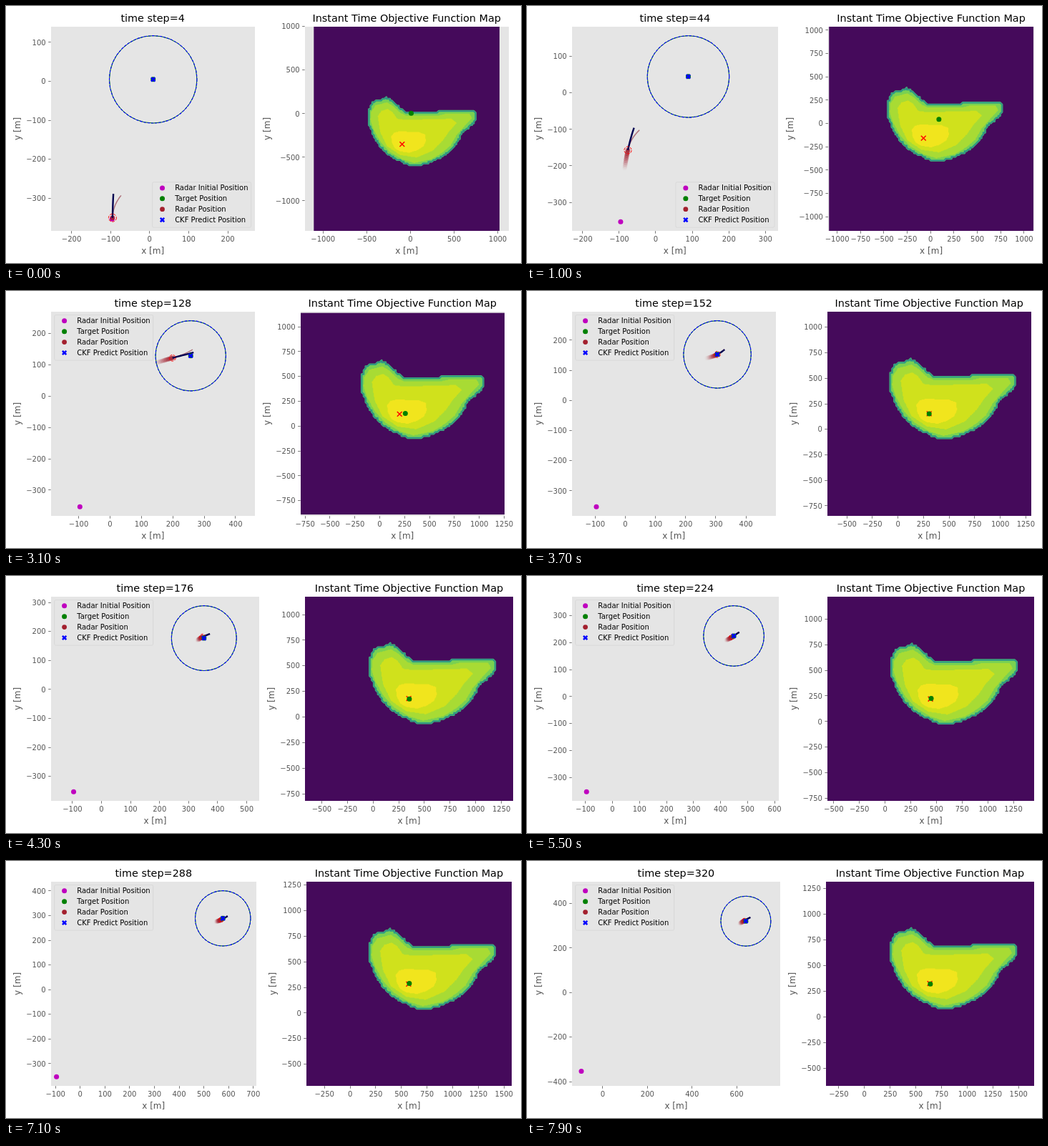
Animation, 720 px wide and 360 px high, one loop 8 s. Source, as an HTML page with a canvas:

```html
<!DOCTYPE html>
<html lang="en">
<head>
<meta charset="utf-8">
<title>Radar tracking</title>
<style>
html, body { margin: 0; width: 720px; height: 360px; overflow: hidden; background: #fff; }
canvas { display: block; }
</style>
</head>
<body>
<canvas id="stage" width="720" height="360"></canvas>
<script>
const ctx = document.getElementById('stage').getContext('2d');
const TOP = 28.6, BOTTOM = 315.2, H = BOTTOM - TOP, LEFT = 62.7, RIGHT = 709.2;
const MID = (TOP + BOTTOM) / 2;
const FRAMES = 80, FRAME_MS = 100;
const START = [-96, -353], RANGE = 112;
const GREY = '#555555', FACE = '#e5e5e5', BROWN = '#a3202e', GREEN = '#008000';
const font = px => px + 'px "DejaVu Sans", sans-serif';

// ---- motion ----
const target = s => [2 * s + 1, s + 0.8];

// step, x, y, vx, vy
const KEYS = [
  [4, -95, -350, 0.1, 4.6],
  [88, 16, 32, 3.4, 3.5],
  [128, 199, 122, 5, 1.4],
  [148, 294, 148, 3, 1.2],
  [176, 348, 181, 2, 1]
];

function radar(s) {
  if (s <= 4) return [-95, -350];
  if (s >= 176) {
    const a = (s - 176) / 76 * 2 * Math.PI;
    return [2 * s - 4 - 2 * Math.sin(a / 2) ** 2, s + 5 * Math.cos(a)];
  }
  let i = 0;
  while (s >= KEYS[i + 1][0]) i++;
  const a = KEYS[i], b = KEYS[i + 1], d = b[0] - a[0], u = (s - a[0]) / d;
  const h = n => {
    const u2 = u * u, u3 = u2 * u;
    return (2 * u3 - 3 * u2 + 1) * a[n] + (u3 - 2 * u2 + u) * d * a[n + 2]
         + (3 * u2 - 2 * u3) * b[n] + (u3 - u2) * d * b[n + 2];
  };
  return [h(1), h(2)];
}

// ---- axes ----
// Equal scale on both axes: margins may shrink to 5% before the other axis grows.
function view(xr, yr, margin, w) {
  const rx = xr[1] - xr[0], ry = yr[1] - yr[0];
  const kx = w / (rx * margin), ky = H / (ry * margin), big = Math.max(kx, ky);
  const fits = w / big >= 1.05 * rx && H / big >= 1.05 * ry;
  const k = fits ? big : Math.min(kx, ky);
  return { k, w, cx: (xr[0] + xr[1]) / 2, cy: (yr[0] + yr[1]) / 2 };
}

function sceneView(s, w) {
  const [tx, ty] = target(s), [rx, ry] = radar(s);
  return view([Math.min(START[0], rx - 10, tx - RANGE), tx + RANGE],
              [Math.min(START[1], ry - 10), ty + RANGE], 1.1, w);
}

function mapSpan(s, pad) {
  const t = target(s), r = radar(s);
  return [0, 1].map(n => [Math.min(t[n], r[n]) - pad, Math.max(t[n], r[n]) + pad]);
}
const mapView = (s, w) => view(...mapSpan(s, 996), 1, w);

function ticks(c, half) {
  const raw = 2 * half / 9, p = 10 ** Math.floor(Math.log10(raw));
  const step = [1, 2, 2.5, 5, 10].find(m => m * p >= raw) * p;
  const out = [];
  for (let v = Math.ceil((c - half) / step) * step; v <= c + half; v += step) out.push(v);
  return out;
}
const xTicks = v => ticks(v.cx, v.w / 2 / v.k);
const yTicks = v => ticks(v.cy, H / 2 / v.k);
const label = v => (v < 0 ? '\u2212' : '') + Math.abs(v);

function labelWidth(v) {
  ctx.font = font(10);
  return ctx.measureText(label(v)).width;
}
const widest = list => Math.max(...list.map(labelWidth));

function overhang(v) {
  const last = xTicks(v).pop();
  return Math.max(0, labelWidth(last) / 2 - (v.w / 2 - (last - v.cx) * v.k));
}

// Each layout is packed using the width of the one before it.
function layouts() {
  const list = [];
  let w = 267;
  for (let i = 0; i < FRAMES; i++) {
    const s = 4 + 4 * i, m = mapView(s, w);
    const gap = 36.2 + widest(yTicks(m)) + overhang(sceneView(s, w));
    const end = RIGHT - overhang(m);
    w = (end - LEFT - gap) / 2;
    list.push({ s, w, mapX: end - w });
  }
  return list;
}

function place(v, x0) {
  v.x0 = x0;
  v.at = ([x, y]) => [x0 + v.w / 2 + (x - v.cx) * v.k, MID - (y - v.cy) * v.k];
  return v;
}

function text(str, x, y, px, color, align) {
  ctx.font = font(px);
  ctx.fillStyle = color;
  ctx.textAlign = align;
  ctx.fillText(str, x, y);
}

function clipAxes(v) {
  const x = Math.round(v.x0), y = Math.round(TOP);
  ctx.beginPath();
  ctx.rect(x, y, Math.round(v.x0 + v.w) - x, Math.round(BOTTOM) - y);
  ctx.fillStyle = FACE;
  ctx.fill();
  ctx.clip();
}

function drawAxes(v, title) {
  const mid = v.x0 + v.w / 2, snap = n => Math.floor(n) + 0.5;
  ctx.strokeStyle = GREY;
  ctx.lineWidth = 0.8;
  ctx.beginPath();
  for (const n of xTicks(v)) {
    const x = v.at([n, 0])[0];
    ctx.moveTo(snap(x), BOTTOM);
    ctx.lineTo(snap(x), BOTTOM + 3.5);
    text(label(n), x, 329.8, 10, GREY, 'center');
  }
  for (const n of yTicks(v)) {
    const y = v.at([0, n])[1];
    ctx.moveTo(v.x0 - 3.5, snap(y));
    ctx.lineTo(v.x0, snap(y));
    text(label(n), v.x0 - 7, y + 3.7, 10, GREY, 'right');
  }
  ctx.stroke();
  text(title, mid, 22.3, 14.4, '#000', 'center');
  text('x [m]', mid, 346.6, 12, GREY, 'center');
  ctx.save();
  ctx.translate(v.x0 - 15 - widest(yTicks(v)), MID);
  ctx.rotate(-Math.PI / 2);
  text('y [m]', 0, 0, 12, GREY, 'center');
  ctx.restore();
}

// ---- marks ----
function dot([x, y], r, color) {
  ctx.fillStyle = color;
  ctx.beginPath();
  ctx.arc(x, y, r, 0, 7);
  ctx.fill();
}

function ring([x, y], r, color, width, dash = []) {
  ctx.strokeStyle = color;
  ctx.lineWidth = width;
  ctx.setLineDash(dash);
  ctx.beginPath();
  ctx.arc(x, y, r, 0, 2 * Math.PI);
  ctx.stroke();
  ctx.setLineDash([]);
}

function fatCross([x, y]) {
  const u = 1.8;
  ctx.fillStyle = '#0000ff';
  ctx.beginPath();
  for (let q = 0; q < 4; q++) {
    const c = Math.cos(q * Math.PI / 2) * u, s = Math.sin(q * Math.PI / 2) * u;
    for (const [a, b] of [[1, 0], [2, 1], [1, 2]]) ctx.lineTo(x + a * c - b * s, y + a * s + b * c);
  }
  ctx.fill();
}

function thinCross([x, y]) {
  ctx.strokeStyle = '#ff0000';
  ctx.lineWidth = 1.5;
  ctx.beginPath();
  for (const d of [-3.4, 3.4]) {
    ctx.moveTo(x - 3.4, y - d);
    ctx.lineTo(x + 3.4, y + d);
  }
  ctx.stroke();
}

function line(points, color, width) {
  ctx.strokeStyle = color;
  ctx.lineWidth = width;
  ctx.lineJoin = 'round';
  ctx.beginPath();
  points.forEach(p => ctx.lineTo(...p));
  ctx.stroke();
}

function legend(v, s) {
  const w = 138, h = 63.5, low = s < 124;
  const x = low ? v.x0 + v.w - 5 - w : v.x0 + 5;
  const y = low ? BOTTOM - 5 - h : TOP + 5;
  ctx.beginPath();
  ctx.roundRect(x, y, w, h, 2);
  ctx.fillStyle = 'rgba(229,229,229,0.8)';
  ctx.fill();
  ctx.strokeStyle = 'rgba(204,204,204,0.8)';
  ctx.lineWidth = 0.6;
  ctx.stroke();
  const rows = [
    ['Radar Initial Position', p => dot(p, 3.5, '#bf00bf')],
    ['Target Position', p => dot(p, 3.5, GREEN)],
    ['Radar Position', p => dot(p, 3.4, BROWN)],
    ['CKF Predict Position', fatCross]
  ];
  rows.forEach(([name, mark], i) => {
    const cy = y + 8.2 + 14.9 * i;
    mark([x + 13.9, cy]);
    text(name, x + 31.5, cy + 3.4, 10, '#000', 'left');
  });
}

// ---- left: tracking scene ----
function altTurn(s) {
  if (s < 88) return -0.33 + 0.0019 * (s - 4);
  return s < 150 ? Math.min(0.15, -0.17 + 0.0078 * (s - 88)) : 0.05;
}

function drawScene(v, s) {
  const r = radar(s), at = v.at, tp = at(target(s)), rp = at(r);
  ctx.save();
  clipAxes(v);
  const plan = [], alt = [], turn = altTurn(s), ahead = 13;
  for (let i = 0; i <= ahead; i++) {
    const p = radar(s + i), a = turn * i / ahead;
    const dx = p[0] - r[0], dy = p[1] - r[1];
    plan.push(at(p));
    alt.push(at([r[0] + dx * Math.cos(a) - dy * Math.sin(a),
                 r[1] + dx * Math.sin(a) + dy * Math.cos(a)]));
  }
  dot(at(START), 3.5, '#bf00bf');
  for (let i = 10; i >= 0; i--) {
    if (s - i < 3) continue;
    ctx.globalAlpha = 0.7 * (1 - i / 11) ** 1.3;
    dot(at(radar(s - i)), 3.2, BROWN);
  }
  ctx.globalAlpha = 0.6;
  line(alt, '#8c2a38', 1.5);
  ctx.globalAlpha = 1;
  line(plan, '#000050', 2.4);
  ring(rp, 10 * v.k, '#ff0000', 1, [3.7, 1.6]);
  ring(tp, RANGE * v.k, GREEN, 1);
  ring(tp, RANGE * v.k, '#0000ff', 1.1, [3.7, 1.6]);
  dot(tp, 3.5, GREEN);
  fatCross(tp);
  legend(v, s);
  ctx.restore();
}

// ---- right: objective map, outlines around the radar ----
const UNIT = 1 / 0.1437;
const OUTER = [-56,-38, -55,-54, -50,-66, -42,-73, -35,-73, -27,-77, -19,-73, -9,-64, 6,-52,
  55,-52, 64,-55, 118,-55, 122,-51, 122,-41, 114,-32, 100,-21, 91,-5, 83,7, 69,18, 50,28,
  28,34, 12,34, -6,26, -25,15, -40,-2, -50,-22];
const MIDDLE = [-52,-40, -51,-53, -44,-64, -25,-69, -15,-63, -2,-51, 8,-47, 60,-47, 70,-50,
  111,-50, 115,-43, 103,-30, 89,-14, 80,2, 66,14, 48,25, 20,31, 0,25, -20,13, -35,-3, -47,-24];
const INNER = [-40,-46, -34,-55, -24,-58, -16,-53, -8,-42, 6,-40, 81,-42, 90,-35, 78,-22,
  67,-6, 50,11, 24,22, -3,18, -25,3, -36,-20];
const CORE = [-18,-13, -13,-19, -5,-21, 27,-20, 38,-16, 39,-5, 35,4, 25,10, 12,14, -3,12,
  -12,7, -17,-3];

function outline(flat, cell) {
  const out = [], n = flat.length;
  const snap = q => Math.round(q * UNIT / cell) * cell;
  for (let i = 0; i < n; i += 2) {
    const x = flat[i], y = flat[i + 1], dx = flat[(i + 2) % n] - x, dy = flat[(i + 3) % n] - y;
    const parts = Math.ceil(Math.hypot(dx, dy) * UNIT / cell);
    for (let j = 0; j < parts; j++) out.push([snap(x + dx * j / parts), -snap(y + dy * j / parts)]);
  }
  return out;
}
const EDGE = outline(OUTER, 20);
const BANDS = [
  [outline(MIDDLE, 7), '#a8db34'],
  [outline(INNER, 7), '#d0e11c'],
  [outline(CORE, 7), '#f1e51d']
];

function trace(points, at, [ox, oy]) {
  ctx.beginPath();
  points.forEach(([x, y]) => ctx.lineTo(...at([x + ox, y + oy])));
  ctx.closePath();
}

function drawMap(v, s) {
  const r = radar(s), at = v.at;
  ctx.save();
  clipAxes(v);
  const [xs, ys] = mapSpan(s, 1011);
  const [x1, y1] = at([xs[0], ys[1]]), [x2, y2] = at([xs[1], ys[0]]);
  ctx.fillStyle = '#450a5b';
  ctx.fillRect(x1, y1, x2 - x1, y2 - y1);
  trace(EDGE, at, r);
  ctx.lineJoin = 'round';
  ctx.fillStyle = '#7ad151';
  ctx.fill();
  for (const [color, width] of [['#4ac16d', 2.8], ['#2c8f8a', 1.5]]) {
    ctx.strokeStyle = color;
    ctx.lineWidth = width;
    ctx.stroke();
  }
  for (const [points, color] of BANDS) {
    trace(points, at, r);
    ctx.fillStyle = color;
    ctx.fill();
  }
  thinCross(at(r));
  dot(at(target(s)), 3.5, GREEN);
  ctx.restore();
}

// ---- playback ----
const LAYOUTS = layouts();

function draw(now) {
  const { s, w, mapX } = LAYOUTS[Math.floor(now / FRAME_MS) % FRAMES];
  ctx.fillStyle = '#fff';
  ctx.fillRect(0, 0, 720, 360);
  const scene = place(sceneView(s, w), LEFT), map = place(mapView(s, w), mapX);
  drawScene(scene, s);
  drawAxes(scene, 'time step=' + s);
  drawMap(map, s);
  drawAxes(map, 'Instant Time Objective Function Map');
}

let began = null;
function tick(now) {
  if (began === null) began = now;
  draw(now - began);
  requestAnimationFrame(tick);
}
draw(0);
requestAnimationFrame(tick);
</script>
</body>
</html>
```
